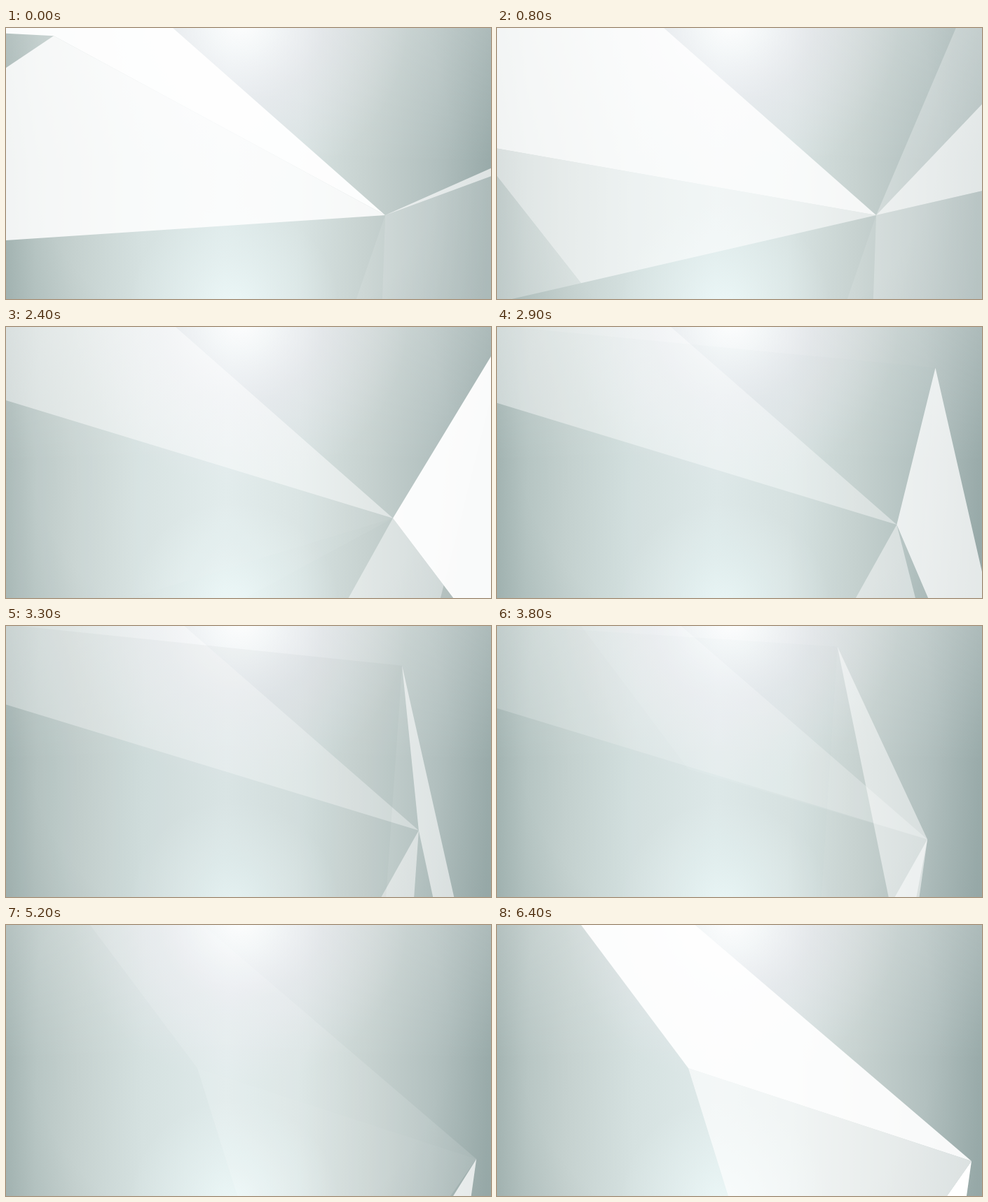
An HTML page with a canvas for the animation above (6500 ms loop, 692 px wide and 388 px high).

```html
<!DOCTYPE html>
<html lang="en">
<head>
<meta charset="utf-8">
<title>Folding light</title>
<style>
  html, body { margin: 0; width: 100%; height: 100%; overflow: hidden; background: #c3cfcd; }
  canvas { display: block; width: 100vw; height: 100vh; }
</style>
</head>
<body>
<canvas id="stage" width="692" height="388"></canvas>
<script>
const W = 692, H = 388, LOOP = 6500, STEP = 100, FAR = 900;
const WHITE = '255,255,255', SHADE = '95,120,118';
const ctx = document.getElementById('stage').getContext('2d');

const lerp = (a, b, k) => a + (b - a) * k;
const ramp = (t, from, to) => Math.min(1, Math.max(0, (t - from) / (to - from)));
const smooth = k => k * k * (3 - 2 * k);

// Linear value through a few [time, value] keys, held at both ends.
function through(t, ...keys) {
  return keys.slice(1).reduce(
    (v, [at, to], i) => t > keys[i][0] ? lerp(keys[i][1], to, ramp(t, keys[i][0], at)) : v,
    keys[0][1]);
}

function withStops(gradient, stops) {
  stops.forEach(([at, color]) => gradient.addColorStop(at, color));
  return gradient;
}

const backdrop = [
  withStops(ctx.createLinearGradient(0, 0, W, 14), [
    [0, '#a5b5b3'], [.07, '#b8c6c4'], [.15, '#c5d1cf'], [.29, '#d5e1e0'],
    [.46, '#dfeaea'], [.61, '#d8e3e2'], [.75, '#c7d2d0'], [.89, '#b2c0bf'], [1, '#9daead']
  ]),
  withStops(ctx.createRadialGradient(330, 150, 300, 330, 150, 460), [
    [0, `rgba(${SHADE},0)`], [1, `rgba(${SHADE},.14)`]
  ]),
  withStops(ctx.createLinearGradient(0, 0, 0, H * .5), [
    [0, `rgba(${WHITE},.2)`], [1, `rgba(${WHITE},0)`]
  ]),
  withStops(ctx.createRadialGradient(335, -10, 0, 335, -10, 240), [
    [0, 'rgba(255,255,255,.95)'], [.2, 'rgba(252,252,254,.65)'],
    [.5, 'rgba(242,236,245,.35)'], [1, 'rgba(236,232,240,0)']
  ]),
  withStops(ctx.createRadialGradient(325, 400, 0, 325, 400, 150), [
    [0, 'rgba(240,252,252,.75)'], [.45, 'rgba(236,248,248,.4)'], [1, 'rgba(232,246,246,0)']
  ])
];

function facet(points, alpha, color = WHITE) {
  if (alpha <= 0) return;
  ctx.beginPath();
  points.forEach(p => ctx.lineTo(...p));
  ctx.fillStyle = `rgba(${color},${alpha})`;
  ctx.fill();
}

function draw(t) {
  backdrop.forEach(paint => {
    ctx.fillStyle = paint;
    ctx.fillRect(0, 0, W, H);
  });

  // Most facets are wedges between rays that turn about one drifting hub.
  const drift = smooth(ramp(t, 1700, 5700));
  const hub = [lerp(541, 677, drift), lerp(268, 338, drift)];
  const ray = deg => {
    const a = deg * Math.PI / 180;
    return [hub[0] + FAR * Math.cos(a), hub[1] + FAR * Math.sin(a)];
  };
  const rayAt = (x, deg) => [x, hub[1] + (x - hub[0]) * Math.tan(deg * Math.PI / 180)];
  const wedge = (a, b, alpha) => facet([hub, ray(a), ray((a + b) / 2), ray(b)], alpha);

  const top = lerp(221.5, 220.6, drift);
  const left = through(t, [0, 208.5], [800, 190], [1400, 197]);
  const bottom = through(t, [0, 176.2], [800, 167], [1400, 163]);
  const wingTop = through(t, [0, -24], [800, -46.5], [1600, -59.7]);
  const wingLow = through(t, [0, -20.3], [800, -13], [1600, 25], [2400, 53], [3300, 78], [4200, 119]);

  // Left side
  const leaving = 1 - ramp(t, 2100, 2450);
  const corner = rayAt(lerp(68, 0, ramp(t, 0, 800)), left);
  const foldEdge = [0, through(t, [0, 57], [800, 212], [1400, H])];
  const foldTip = rayAt(through(t, [0, 0], [800, 120], [1400, 140]), bottom);
  facet([hub, ray(top), [-10, corner[1] - 4], corner],
    through(t, [0, .95], [800, .84], [1400, .65], [2100, .65], [2400, .5], [3300, .36], [4200, .08], [4900, 0]));
  facet([hub, corner, foldEdge, foldTip], through(t, [0, .85], [800, .58], [1400, .55]) * leaving);
  facet([foldEdge, foldTip, rayAt(0, bottom)], .3 * leaving);
  wedge(bottom, lerp(167, 151.5, ramp(t, 800, 1400)), .3 * ramp(t, 800, 1400) * leaving);

  // Fan and foot, under the wing
  wedge(wingTop, through(t, [0, -24], [800, -67], [1600, -80]),
    .28 * ramp(t, 0, 800) * (1 - ramp(t, 1600, 2400)));
  wedge(109, 92, .1 * (1 - ramp(t, 800, 1600)));
  wedge(through(t, [800, 92], [1600, 111], [2400, 119], [4200, 119.5], [6400, 125]),
    Math.min(98, wingLow + 16 * ramp(t, 2400, 3300)),
    through(t, [0, .2], [1600, .42], [4200, .55], [6400, 1]));

  const slide = ramp(t, 1600, 2400);
  facet([[lerp(739, 717, slide), 0], [lerp(632, 620, slide), H], [W, H], [W, 0]],
    .25 * ramp(t, 1000, 1600) * (1 - ramp(t, 2400, 2900)), SHADE);

  // The wing's tip arcs across the stage as it turns over.
  const sweep = ramp(t, 2400, 4200) ** 1.1;
  const tip = [lerp(692, 420, sweep), 42 + 108 * sweep - 164 * sweep ** 2];
  const wingLight = through(t, [0, .68], [1600, .75], [2400, .95], [3300, .58], [4200, .42], [4900, 0]);
  facet([[0, -2], tip, [tip[0] - 23, H], [0, H]],
    .05 * ramp(t, 2700, 3300) * (1 - ramp(t, 3300, 4000)), SHADE);
  if (t < 2400) wedge(wingTop, wingLow, wingLight);
  else facet([hub, tip, [lerp(768, 492, sweep), H], ray(wingLow)], wingLight);

  // Closing band
  const hinge = [273, 205];
  facet([hub, ray(top), [120, 0], hinge],
    through(t, [3300, 0], [4200, .12], [5600, .12], [6400, .92]));
  facet([hub, hinge, [330, H], ray(125)], through(t, [4900, 0], [5600, .35], [6400, .65]));
}

const start = performance.now();
function tick() {
  const t = (performance.now() - start) % LOOP;
  draw(Math.floor(t / STEP) * STEP);
  requestAnimationFrame(tick);
}
tick();
</script>
</body>
</html>
```
